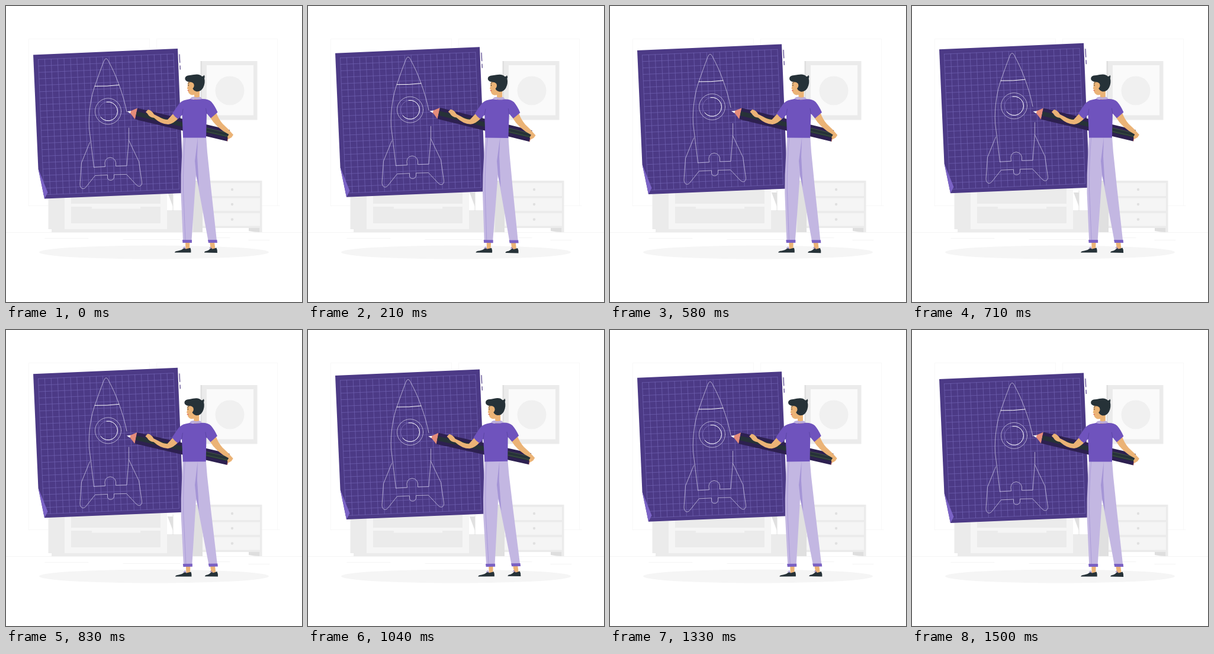
These frames come from a looping animation (500x500 px, 1540 ms). An HTML page:

```html
<!DOCTYPE html>
<html lang="en">
<head>
<meta charset="utf-8">
<title>Rocket blueprint</title>
<style>
  html, body { margin: 0; width: 100%; height: 100%; overflow: hidden; background: #fff; }
  svg { display: block; width: 100vw; height: 100vh; }
  .line { fill: none; stroke-linecap: round; stroke-linejoin: round; }
</style>
</head>
<body>
<svg viewBox="0 0 500 500">
  <g id="room">
    <g class="line" stroke="#f5f5f5" stroke-width=".7">
      <path d="M38.500 337V55.500H242.500V70M254.500 70V55.500H458.500V337M38 337.500H72M432 337.500H462"/>
      <path stroke="#f0f0f0" d="M0 382.500H500M66 392.500H139M198 394.500H294M356 391.500H378M410 395.500H445"/>
    </g>
    <ellipse cx="250" cy="416" rx="194" ry="11.500" fill="#f5f5f5"/>
    <path fill="#ebebeb" d="M71.500 295H272V377H71.500ZM272 345H332V382H272ZM77 377H300V382H77Z"/>
    <path fill="#e0e0e0" d="M316 295H332V382H316ZM273 315H282V339Z"/>
    <path fill="#f5f5f5" d="M99 295H272V377H99Z"/>
    <path fill="#ebebeb" d="M110 305H261V334H110ZM110 339H261V367H110Z"/>
    <path fill="#f5f5f5" d="M145 338H227V342.500H145Z"/>
    <path class="line" stroke="#e0e0e0" d="M282 312V346"/>
    <path fill="#ebebeb" d="M332 295H432.500V382H428V375H332Z"/>
    <path fill="#f5f5f5" d="M332 299H429V321H332ZM332 324.500H429V346H332ZM332 350H429V371.500H332Z"/>
    <path fill="#dedede" d="M410 375H428V382Q419 382 410 380Z"/>
    <g fill="#e0e0e0">
      <circle cx="382" cy="310" r="2.200"/>
      <circle cx="382" cy="335" r="2.200"/>
      <circle cx="382" cy="360.500" r="2.200"/>
    </g>
    <path fill="#ebebeb" d="M329 93H424.500V192.500H329Z"/>
    <path fill="#dfdfdf" d="M328.500 93H331V192H328.500Z"/>
    <path fill="#fafafa" d="M339 100H418V184.500H339Z"/>
    <circle cx="378" cy="143" r="24.500" fill="#f0f0f0"/>
  </g>

  <g id="board">
    <path fill="#4c3a86" d="M46 82.500L290 72L300 316L65 325.500L54.500 275Z"/>
    <path id="grid" class="line" stroke="#7263b3" stroke-width=".7"/>
    <path fill="#7b63c6" d="M54.500 275L70.500 315L65 325.500Z"/>
    <path class="line" stroke="#4c3a86" stroke-width="1.200" d="M293 82L293.700 95.500M294 101L294.300 107"/>
    <g class="line" stroke="#dcd7ee" stroke-width=".7">
      <path d="M148.500 272.500L140.500 207C139 180 144 152 150 135.500C155 121 160 107 165 94Q168.500 85 172.500 92C180 106 186 119 191 133.500C197 150 201 164 204 179"/>
      <path stroke="#fff" stroke-width="1" d="M150 135.500Q171 136 191 133.500"/>
      <path d="M148.500 272.500L167.500 271.500Q164.500 257 176 256Q187 257 185.500 270.500L204 270L207.500 225V206"/>
      <path d="M141.500 230.500L127.500 265L125 301C125 309 131 311 135 306L150.500 286.500L171.500 285.500V290Q172 294.500 177 294.500Q182 294 182.500 289V285L203.500 284.500L220 302C225 307 230 304 229.500 298L224.500 263L207.500 227"/>
      <circle cx="172.500" cy="178" r="22"/>
      <circle cx="172.500" cy="178" r="16" stroke="#8f80c6" stroke-width=".6"/>
      <path stroke="#fff" stroke-width="1" d="M170 162.200A16 16 0 1 1 160 188"/>
    </g>
  </g>

  <g id="man">
    <g id="pencil">
      <path fill="#e58c7a" d="M208 178.500L222 172.500L218 191.500Z"/>
      <path fill="#fff" d="M204.500 178L211 177.300L209.800 181.500Z"/>
      <path fill="#2d2050" d="M222 172.500L378 209.500L374 228.500L218 191.500Z"/>
      <path fill="#263238" d="M221 178L377 215L375.500 222.500L219.500 185.500Z"/>
      <path class="line" stroke="#5c7a4a" stroke-width=".5" d="M339 206L375 214.500M339 212L374 220"/>
      <path class="line" stroke="#e58c7a" stroke-width="1" d="M375 223.500L374 228"/>
    </g>
    <g fill="#ebb376">
      <path d="M284 180L273 192Q266 192 258 187L250 183Q246 176 240 175L236 179L239 182Q242 188 250 189Q262 200 274 200Q283 199 292 189Z"/>
      <path d="M344 187L355 180Q359 191 366 199Q375 207 384 217.500L381 222L375.500 225L374 221L376.500 217Q355 206 344 187Z"/>
      <path d="M303 398H310.500L310 411H303.500ZM344 398H352L353.500 411H346Z"/>
      <path d="M308.500 126Q306 132 306.800 136L305.800 139.500L307.500 141Q307 149 314 150.500L318 150V158H327V140L322 124Z"/>
    </g>
    <path class="line" stroke="#d9534a" stroke-width="1.200" d="M307 142.500L308.500 143"/>
    <path class="line" stroke="#263238" stroke-width=".9" d="M307.500 130.500L309.500 129.500M308.300 133V134.500"/>
    <path fill="#263238" d="M311 128.500Q304 128 302.500 124Q301.500 119 307 117.500Q312 117 317 116Q327 114 331 119Q334 119 334.500 116.500Q336.500 119 335 122Q337 130 333 138Q329 145 322 144.500Q316 143 315 138L317.500 132Q315 128 311 128.500Z"/>
    <path fill="#ebb376" d="M312.500 133.500Q315.500 130.500 317.800 133.500Q317.500 139 314 139.500Z"/>

    <path fill="#263238" d="M285 416.500Q285 414 291 413.500Q297 412.500 301 409L304 410.500L311.500 408.500Q313 412 312.500 416.500Z"/>
    <path fill="#263238" d="M335 416.500Q335 414 340 413.500Q343 412.500 346 409L349 410.500L355.500 408.500Q357.500 412 357 417Z"/>
    <path class="line" stroke="#6f52bd" stroke-width=".8" d="M299 409L301.500 407L303 410M344 409L345.500 407L348 410"/>
    <path fill="#c3b7e2" d="M299 220H338L340 247Q343 275 346 305L356 396H341.500L321 285L318 330L313.500 396H299L295.500 316Q295 285 297 255Z"/>
    <path fill="#a595d6" d="M324 222L323 254L326 306L321.500 288L319 262Z"/>
    <path class="line" stroke="#a595d6" stroke-width=".8" d="M302.500 223Q299 270 299.500 310L303 395"/>
    <path fill="#7a61c3" d="M298 395H314V400H298.500ZM341 395H356.500L357 400H342Z"/>

    <path fill="#b9abdc" d="M311 157Q312 153 318 153.500Q322 155.500 327 153.500Q331 154 331.500 158Z"/>
    <path fill="#6f53bd" d="M311 157Q321 159 332 157Q342 157 347 162Q353 169 357.500 179.500L346 189.500L339 181.500L338 222.500H299L297.500 184L290.500 191Q285 187 281 181.500L291 167Q296 160 304 158.500Z"/>
    <path class="line" stroke="#54409a" stroke-width=".7" d="M297.500 184L299 174M339 182L337.500 173"/>
  </g>
</svg>
<script>
  const LOOP = 1540;
  const el = id => document.getElementById(id);
  const board = el("board"), man = el("man");

  // Blueprint grid, slightly tilted
  const CELLS = 21, STEP = 228.6 / CELLS, TILT = -2.4 * Math.PI / 180;
  const at = (col, row) => {
    const x = col * STEP, y = row * STEP;
    const px = 54.5 + x * Math.cos(TILT) - y * Math.sin(TILT);
    const py = 90.5 + x * Math.sin(TILT) + y * Math.cos(TILT);
    return px.toFixed(2) + " " + py.toFixed(2);
  };
  let lines = "";
  for (let i = 0; i <= CELLS; i++) {
    lines += `M${at(i, 0)}L${at(i, CELLS)}M${at(0, i)}L${at(CELLS, i)}`;
  }
  el("grid").setAttribute("d", lines);

  // Linear swing between 1 (at phase 0) and -1 (at phase 0.5)
  const swing = phase => Math.abs(((phase % 1) + 1) % 1 - 0.5) * 4 - 1;

  function draw(now) {
    const phase = (now + 45) / LOOP;
    board.setAttribute("transform", `translate(0 ${5 * swing(phase) - 4.5})`);
    man.setAttribute("transform", `rotate(${swing(phase - 0.25) - 0.1} 294 266)`);
  }

  let start;
  function tick(now) {
    start ??= now;
    draw(now - start);
    requestAnimationFrame(tick);
  }
  draw(0);
  requestAnimationFrame(tick);
</script>
</body>
</html>
```
